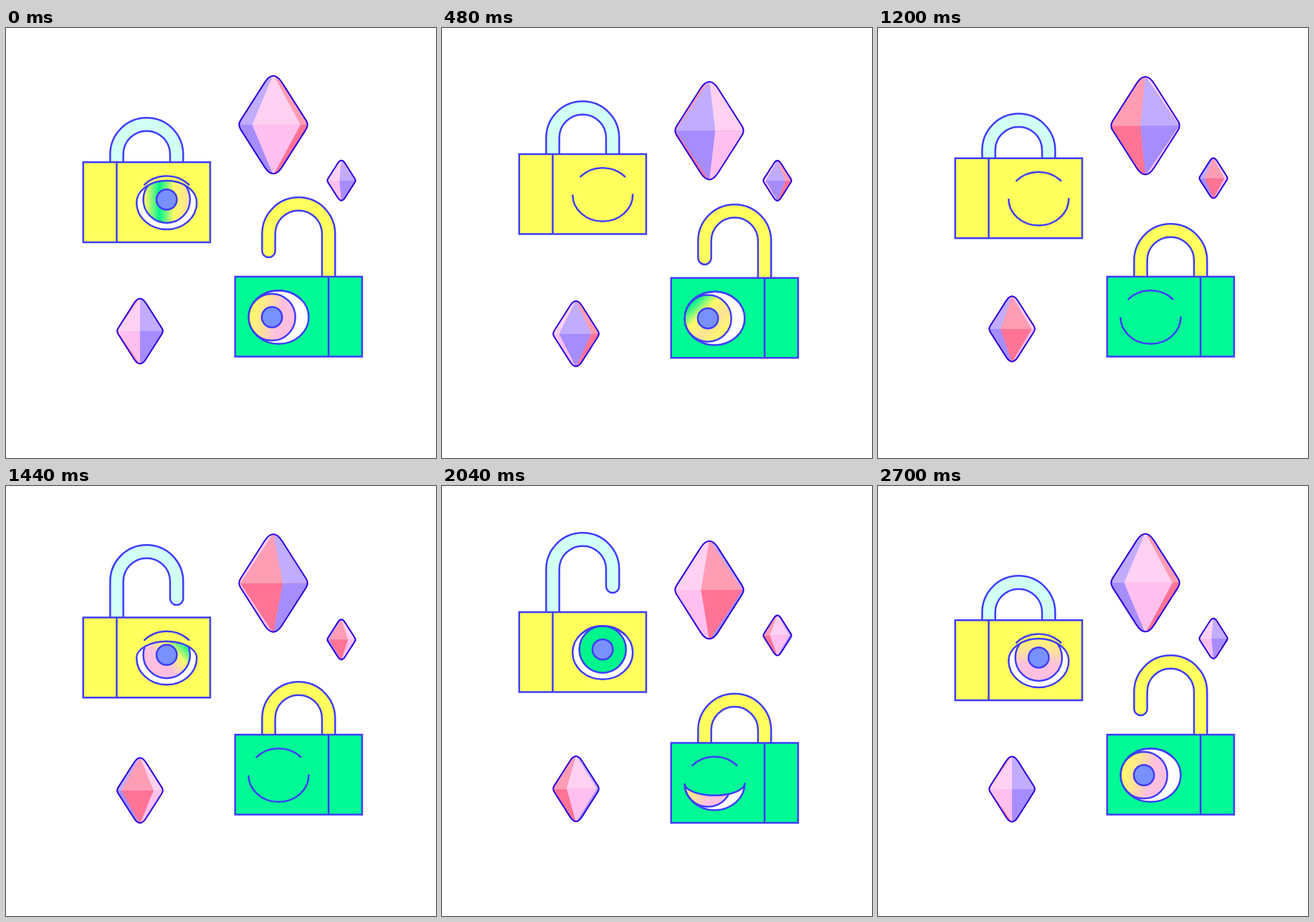
Recreate the animation shown at these times as an HTML page with a canvas. Size 600x600 px, loop 2.76 s.

```html
<!DOCTYPE html>
<html lang="en">
<head>
<meta charset="utf-8">
<title>Locks and gems</title>
<style>
html, body { margin: 0; width: 100%; height: 100%; overflow: hidden; background: #fff; }
canvas { display: block; width: 600px; height: 600px; }
</style>
</head>
<body>
<canvas id="stage" width="600" height="600"></canvas>
<script>
const ctx = document.getElementById('stage').getContext('2d');
const LOOP = 2760, CYCLE = 2700, STEP = 60;
const INK = '#3f3cff', GEM_INK = '#2800e0';

// Lock poses over one cycle: [ms, value], eased between entries
const SHACKLE = [[0, 60], [180, 37], [1080, 37], [1260, 60], [1540, 0], [2373, 0], [2700, 60]];
const DIP = [[0, 11.3], [180, 0], [1080, 0], [1320, 11.5], [1620, 0], [2380, 0], [2700, 11.3]];
const LID = [[-40, -37.3], [170, 37.3], [1204, 37.3], [1534, -37.3], [2660, -37.3], [2870, 37.3]];

const HUES = {
  y: [255, 250, 105], g: [0, 245, 140], l: [185, 255, 100],
  o: [255, 226, 150], p: [255, 192, 224]
};

// Iris sheen: [ms, gradient angle, four stops]
const LOCKS = [
  {
    x: 196.3, y: 176, dir: 1, delay: 0, body: '#ffff5e', bar: '#d2fff5', iris: [0, -4.4],
    sheen: [[0, 0, 'ygyo'], [1440, 135, 'gypp'], [2040, 270, 'gggg'], [2400, 360, 'lggg'], [2700, 450, 'yopp']]
  },
  {
    x: 408.3, y: 347, dir: -1, delay: 720, body: '#00fa96', bar: '#ffff5e', iris: [-9.3, 0],
    sheen: [[0, 15, 'yopp'], [480, 45, 'gyoy'], [2040, 25, 'yopp'], [2400, 90, 'ppoo'], [2700, 15, 'yopp']]
  }
];

// Faces as [upper, lower]
const LILAC = ['#c1acff', '#a68dff'], PINK = ['#ffd1f2', '#ffc0f0'], CORAL = ['#ff9db4', '#ff7395'];

const GEMS = [
  { x: 373, y: 140.1, bob: 5, phase: -90, size: 1, turn: 52, spin: 0.1, faces: [LILAC, CORAL, PINK] },
  { x: 187, y: 422.9, bob: 4.7, phase: 0, size: 0.667, turn: 90, spin: -0.1, faces: [PINK, CORAL, LILAC] },
  { x: 468, y: 210.8, bob: 4.7, phase: 25, size: 0.41, turn: 82, spin: -0.1, faces: [PINK, CORAL, LILAC] }
];

const rad = deg => deg * Math.PI / 180;
const mix = (a, b, k) => a + (b - a) * k;

function span(keys, t) {
  let i = 0;
  while (i < keys.length - 2 && t >= keys[i + 1][0]) i++;
  const [a, b] = [keys[i], keys[i + 1]];
  const k = Math.min(1, Math.max(0, (t - a[0]) / (b[0] - a[0])));
  return [a, b, k];
}

function eased(keys, t) {
  const [a, b, k] = span(keys, t);
  return mix(a[1], b[1], (1 - Math.cos(Math.PI * k)) / 2);
}

function disc(x, y, r, fill) {
  ctx.beginPath();
  ctx.arc(x, y, r, 0, 7);
  ctx.fillStyle = fill;
  ctx.fill();
  ctx.stroke();
}

function sheen(keys, t, x, y) {
  const [a, b, k] = span(keys, t);
  const angle = rad(mix(a[1], b[1], k));
  const dx = 30 * Math.cos(angle), dy = 30 * Math.sin(angle);
  const grad = ctx.createLinearGradient(x - dx, y - dy, x + dx, y + dy);
  for (let i = 0; i < 4; i++) {
    const from = HUES[a[2][i]], to = HUES[b[2][i]];
    grad.addColorStop(i / 3, `rgb(${from.map((c, n) => Math.round(mix(c, to[n], k)))})`);
  }
  return grad;
}

function drawShackle(x, top, dir, color) {
  const r = 41.8, cy = top + 51.3;
  const free = cy + 23.6, fixed = cy + 85;
  ctx.beginPath();
  ctx.moveTo(x - r, dir > 0 ? fixed : free);
  ctx.lineTo(x - r, cy);
  ctx.arc(x, cy, r, Math.PI, 0);
  ctx.lineTo(x + r, dir > 0 ? free : fixed);
  ctx.lineCap = 'round';
  ctx.lineWidth = 20.8;
  ctx.strokeStyle = INK;
  ctx.stroke();
  ctx.lineWidth = 15.8;
  ctx.strokeStyle = color;
  ctx.stroke();
}

function drawEye(lock, x, y, lid, t) {
  ctx.beginPath();
  ctx.ellipse(x, y, 42, 37.3, 0, 0, Math.PI);
  ctx.ellipse(x, y, 42, Math.abs(lid), 0, Math.PI, lid < 0 ? 2 * Math.PI : 0, lid > 0);
  const shape = () => {
    const p = new Path2D();
    p.ellipse(x, y, 42, 37.3, 0, 0, Math.PI);
    p.ellipse(x, y, 42, Math.abs(lid), 0, Math.PI, lid < 0 ? 2 * Math.PI : 0, lid > 0);
    return p;
  };
  const eye = shape();
  if (lid < 37) {
    ctx.save();
    ctx.clip(eye);
    ctx.fillStyle = '#fff';
    ctx.fill(eye);
    const ix = x + lock.iris[0], iy = y + lock.iris[1];
    disc(ix, iy, 32.6, sheen(lock.sheen, t, ix, iy));
    disc(ix, iy, 14.2, '#7891ff');
    ctx.restore();
  }
  ctx.stroke(eye);
  ctx.beginPath();
  ctx.ellipse(x, y, 42, 37.3, 0, rad(222.4), rad(317.6));
  ctx.stroke();
}

function drawLock(lock, t) {
  const u = (t - lock.delay + CYCLE) % CYCLE;
  const { x, dir } = lock, y = lock.y + eased(DIP, u);
  drawShackle(x, lock.y - 111 + eased(SHACKLE, u), dir, lock.bar);

  ctx.strokeStyle = INK;
  ctx.lineWidth = 2.5;
  ctx.fillStyle = lock.body;
  ctx.beginPath();
  ctx.rect(x - 88.6, y, 177.2, 111.6);
  ctx.fill();
  ctx.moveTo(x - dir * 41.8, y);
  ctx.lineTo(x - dir * 41.8, y + 111.6);
  ctx.stroke();
  drawEye(lock, x + dir * 27.9, y + 56.5, eased(LID, u), t);
}

// Diamond with softened corners, centred on 0,0
function gemPath(s) {
  const pts = [[0, -78], [49.7, 0], [0, 78], [-49.7, 0]].map(p => p.map(v => v * s));
  const path = new Path2D();
  pts.forEach((p, i) => {
    const cut = i % 2 ? 0.08 : 0.25;
    const toward = q => [mix(p[0], q[0], cut), mix(p[1], q[1], cut)];
    const a = toward(pts[(i + 3) % 4]), b = toward(pts[(i + 1) % 4]);
    if (i) path.lineTo(...a); else path.moveTo(...a);
    path.quadraticCurveTo(...p, ...b);
  });
  path.closePath();
  return path;
}

function drawGem(gem, t) {
  const s = gem.size, outline = gemPath(s), w = 48 * s, h = 70 * s, far = 80 * s;
  const angle = gem.turn + gem.spin * t;
  const face = k => gem.faces[((k % 3) + 3) % 3];
  // Every facet fills to the right of its left edge
  const facet = (edge, [upper, lower]) => {
    [[upper, -1], [lower, 1]].forEach(([color, side]) => {
      ctx.beginPath();
      ctx.moveTo(edge, 0);
      ctx.lineTo(edge === -far ? -far : 0, side * h);
      ctx.lineTo(edge === -far ? -far : 0, side * far);
      ctx.lineTo(far, side * far);
      ctx.lineTo(far, 0);
      ctx.fillStyle = color;
      ctx.fill();
    });
  };

  ctx.save();
  ctx.translate(gem.x, gem.y + gem.bob * Math.sin(rad(gem.phase + 720 * t / CYCLE)));
  ctx.save();
  ctx.clip(outline);
  const first = Math.floor(angle / 90);
  facet(-far, face(first));
  for (let k = first; angle - 90 * k < 180; k--) {
    facet(-w * Math.cos(rad(angle - 90 * k)), face(k - 1));
  }
  ctx.restore();
  ctx.strokeStyle = GEM_INK;
  ctx.lineWidth = 2;
  ctx.stroke(outline);
  ctx.restore();
}

function draw(t) {
  ctx.fillStyle = '#fff';
  ctx.fillRect(0, 0, 600, 600);
  GEMS.forEach(gem => drawGem(gem, t));
  LOCKS.forEach(lock => drawLock(lock, t));
}

const start = performance.now();
function tick() {
  const t = Math.max(0, performance.now() - start) % LOOP;
  draw(Math.floor(t / STEP) * STEP);
  requestAnimationFrame(tick);
}
tick();
</script>
</body>
</html>
```
